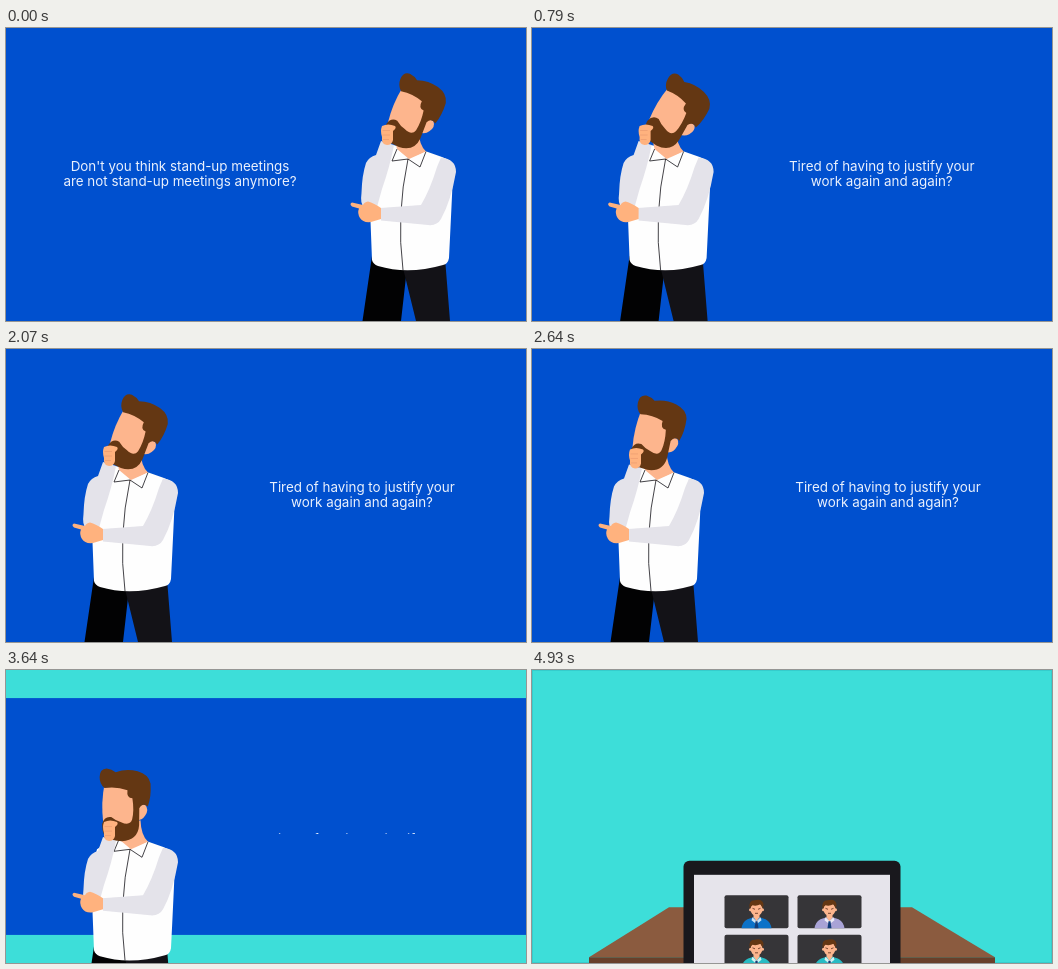
An HTML page for the animation above (5000 ms loop, 520x293 px).

```html
<!DOCTYPE html>
<html lang="en">
<head>
<meta charset="utf-8">
<title>Stand-up meetings</title>
<style>
  html, body { margin: 0; height: 100%; overflow: hidden; background: #0050cf; }
  svg { display: block; width: 100vw; height: 100vh; }
  text { font: 400 13.4px Inter, "Open Sans", sans-serif; fill: #eaf1fd; text-anchor: middle; }
  .skin { fill: #fdb58d; }
  .hand { fill: #ffb27e; }
  .hair { fill: #643713; }
  .sleeve { fill: #e4e3ea; }
  .white { fill: #fefefe; }
  .line { fill: none; stroke: #15141a; stroke-width: .8; }
</style>
</head>
<body>
<svg viewBox="0 0 520 293">
  <defs>
    <clipPath id="mask"><rect y="128" width="520" height="36"/></clipPath>
    <g id="caller">
      <path d="M-15 33Q-14 25-6 23L0 21 6 23Q14 25 15 33Z"/>
      <path class="skin" d="M-3 17H3V22L0 26-3 22Z"/>
      <path class="white" d="M-4 22L0 26 4 22 5 25 0 29-5 25Z" opacity=".8"/>
      <path d="M-1 26H1L2 33H-2Z" fill="#123c78"/>
      <ellipse class="skin" cy="14" rx="6" ry="6.5"/>
      <circle class="skin" cx="-6" cy="14.5" r="1.5"/>
      <circle class="skin" cx="6" cy="14.5" r="1.5"/>
      <path class="hair" d="M-7 13Q-8 5-2 5Q6 3 7 9L6.5 13Q5 11 4 9Q0 11-4 10Q-6 11-6 13Z"/>
      <path class="line" d="M-4 13L-1.5 14M4 13L1.5 14M-1.5 18H1.5" style="stroke:#5a2d1c"/>
    </g>
  </defs>

  <rect width="520" height="293" fill="#0050cf"/>
  <g clip-path="url(#mask)">
    <g id="copy"><text id="top" y="142.7"></text><text id="low" y="157.7"></text></g>
  </g>

  <g fill="#3dded9">
    <rect id="barTop" width="520"/>
    <rect id="barLow" width="520"/>
  </g>
  <rect id="edge" x=".5" y=".5" width="519" height="292" fill="none" stroke="#35cccc"/>

  <g id="man">
    <path d="M366 228L356.500 293V350H395V293L401 240Z" fill="#020203"/>
    <path d="M397 240L410 293V350H444V293L439 230Z" fill="#131217"/>
    <path class="white" d="M387 117Q377 126 369 131Q363 150 364 180L366 232Q367 236 372 238Q402 247 437 237Q442 236 443 230Q445 190 447 146Q448 133 436 129L419 123Z"/>
    <path class="skin" d="M388 108L412.500 102Q413 117 420 123.500L403 132Q395 130 391 121Z"/>
    <path class="white" d="M391 121L386 133 402 131 414 139 420 123.500 403 131Z"/>
    <path class="line" d="M391 121L386 133 402 131 414 139 420 123.500M402 131Q390 187 397 242"/>
    <g id="head">
      <path class="skin" d="M376 66Q372.500 85 375 104L384 112 405 109 412 96 408 66Z"/>
      <path class="skin" d="M407 90Q412 85 417 86.500Q421 91 417 97Q414 102 408 102Z"/>
      <path class="hair" d="M376 70Q371 66 371 59Q371 51 378 50.500Q383 51 387 54Q398 50 409 53Q420 56 422 65Q423 78 419.500 88Q414 84 411 90V107Q410 122 394 123L382 122Q374 119 374 106Q376 98 383 99Q388 103 393 104Q402 108 404 101Q406 92 404 80Q398 80 399 72Q388 68 376 70Z"/>
    </g>
    <path class="sleeve" d="M435 129.500Q450 131 450 144Q445 173 435 191Q431 198 422 197L375 192.500 374 180 415 177Q424 162 431 139Z"/>
    <g id="arm">
      <path class="sleeve" d="M375 113L388 117Q384 138 376 161L371 179 358 179Q354 176 355.500 165Q356 147 360 135Q363 129 370 127Z"/>
      <path class="hand" d="M376 98Q382 95 389 98Q391 100 387 103L387 112Q386 117 381 117Q375 116 376 109Q374 103 376 98Z"/>
      <path d="M376.500 102.500H384M376.500 107H384M377 111.500H383" stroke="#ec9d72" stroke-width=".8"/>
    </g>
    <path class="hand" d="M346 174.500Q343 176 346 178.500L353 180.500Q351 185 354 190Q357 195 365 194L375 191V180Q368 175 362 173.500Q358 174 357 177Z"/>
  </g>

  <g id="desk">
    <path d="M137 238H380L463 288H57Z" fill="#8b5b3f"/>
    <path d="M57 288H463V300H57Z" fill="#68402a"/>
    <rect x="151.500" y="191.500" width="217" height="150" rx="6" fill="#19181d"/>
    <rect x="162" y="205.500" width="196" height="130" fill="#e6e4eb"/>
    <g id="tiles"></g>
  </g>
</svg>
<script>
const $ = id => document.getElementById(id);
const set = (id, name, value) => $(id).setAttribute(name, value);
const clamp = v => Math.min(1, Math.max(0, v));
const ease = (t, start, span, pow) => {
  const u = clamp((t - start) / span);
  return u < .5 ? (2 * u) ** pow / 2 : 1 - (2 - 2 * u) ** pow / 2;
};

const lines = [
  ["Don't you think stand-up meetings", "are not stand-up meetings anymore?"],
  ["Tired of having to justify your", "work again and again?"]
];

$("tiles").innerHTML = ["#0c72c8", "#a9a3d6", "#27bcc4", "#27bcc4"].map((shirt, i) =>
  `<g transform="translate(${192.5 + i % 2 * 73} ${226 + (i >> 1) * 39.5})">
    <rect width="64" height="33" rx="2" fill="#363538"/>
    <use href="#caller" x="32" fill="${shirt}"/></g>`).join("");

// The head leans back for a second, then slowly comes upright.
function tilt(t) {
  return t < 1000
    ? 21 + 9 * Math.sin(t / 1000 * Math.PI / 2)
    : 15 + 15 * Math.cos(clamp((t - 1000) / 2900) * Math.PI);
}

function draw(t) {
  const swap = ease(t, 84, 1000, 5);
  const close = ease(t, 3246, 957, 5);
  const wipe = ease(t, 3200, 600, 3);
  const rise = 240 * ease(t, 4330, 1262, 3);
  const angle = tilt(t);

  const [top, low] = lines[t < 70 ? 0 : 1];
  $("top").textContent = top;
  $("low").textContent = low;
  set("copy", "transform", `translate(${174 + 182 * swap} ${34 * wipe})`);

  set("man", "transform", `translate(${-278 * swap} ${252 * close})`);
  set("man", "visibility", t < 4070 ? "visible" : "hidden");
  set("head", "transform", `rotate(${angle} 404 118)`);
  set("arm", "transform", `translate(0 ${Math.max(0, 20 - angle) * .3})`);

  const bar = t < 4070 ? 146.5 * close : 147;
  set("barTop", "height", bar);
  set("barLow", "height", bar);
  set("barLow", "y", 293 - bar);
  set("edge", "visibility", t < 4000 ? "hidden" : "visible");

  set("desk", "transform", `translate(0 ${103 - rise})`);
  set("desk", "visibility", t < 4400 ? "hidden" : "visible");
}

const begin = performance.now();
function tick() {
  draw((performance.now() - begin) % 5000);
  requestAnimationFrame(tick);
}
tick();
</script>
</body>
</html>
```
